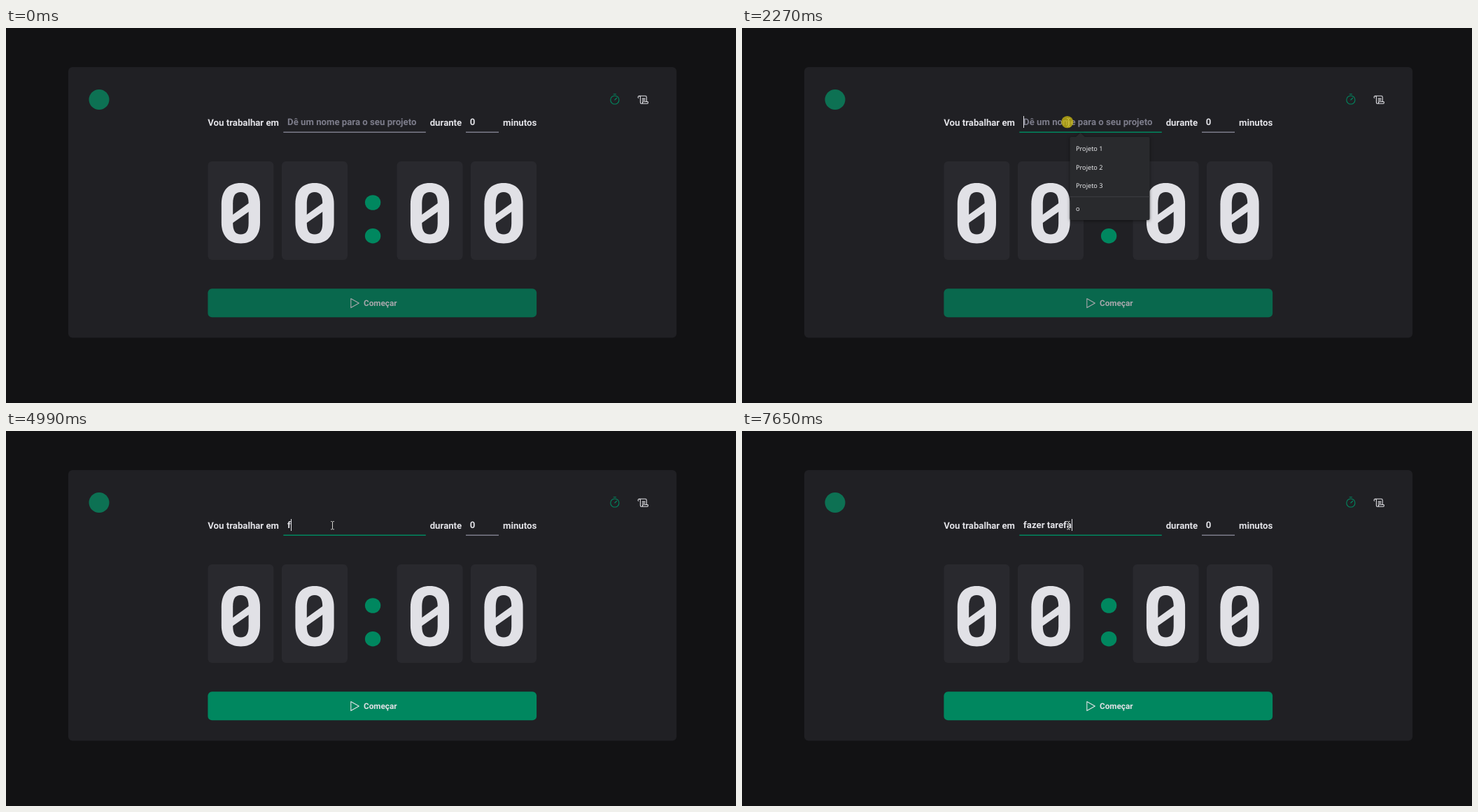
Recreate the animation shown at these times as an HTML page. Size 1043 by 537 pixels, loop 8000 ms.

```html
<!DOCTYPE html>
<html lang="pt-BR">
<head>
<meta charset="utf-8">
<title>Temporizador</title>
<style>
html, body { margin: 0; width: 100%; height: 100%; overflow: hidden; background: #121214; }
svg { display: block; width: 1043px; height: 537px; }
text { font: 700 13.2px Roboto, sans-serif; fill: #e1e1e6; white-space: pre; text-rendering: geometricPrecision; }
#popup text { font: 400 9.2px "Open Sans", sans-serif; fill: #f4f5f7; }
#start text { font-size: 11.75px; }
.icon { fill: none; stroke-width: 16; stroke-linecap: round; stroke-linejoin: round; }
#beam { mix-blend-mode: difference; }
</style>
</head>
<body>
<svg viewBox="0 0 1043 537">
  <defs>
    <g id="zero">
      <path fill="#e1e1e6" fill-rule="evenodd" d="M-27.6-13C-27.6-33-17-43.2 0-43.2S27.6-33 27.6-13V13C27.6 33 17 43.2 0 43.2S-27.6 33-27.6 13ZM-11.2-15V15C-11.2 26-7.5 30.3 0 30.3S11.2 26 11.2 15V-15C11.2-26-7.5-30.3 0-30.3S-11.2-26-11.2-15Z" visibility="hidden"/>
      <path fill="#e1e1e6" d="M-27.6-13C-27.6-33-17-43.2 0-43.2S27.6-33 27.6-13V13C27.6 33 17 43.2 0 43.2S-27.6 33-27.6 13Z"/>
      <path fill="#29292e" d="M-11.2-14C-11.2-25.5-7.5-30.3 0-30.3S11.2-25.5 11.2-14V14C11.2 25.5 7.5 30.3 0 30.3S-11.2 25.5-11.2 14Z"/>
      <path fill="#e1e1e6" d="M-13 3.2 13-15.4V-3.2L-13 15Z"/>
    </g>
  </defs>

  <rect width="1043" height="537" fill="#121214"/>
  <rect x="89" y="56" width="869" height="387.5" rx="5.9" fill="#202024"/>
  <circle cx="133" cy="102.5" r="14.5" fill="#0d7153"/>

  <g class="icon" stroke="#00875f" transform="translate(861 94.2) scale(.0688)">
    <circle cx="128" cy="128" r="88"/>
    <path d="M128 128 168 88M104 8h48"/>
  </g>
  <g class="icon" stroke="#e1e1e6" transform="translate(901.4 94) scale(.0688)">
    <path d="M112 104h56M112 136h56M29 88A24 24 0 1 1 72 72V184a24 24 0 0 0 48 0q0-10-8-16H224q8 6 8 16a24 24 0 0 1-24 24H96M48 48H176a24 24 0 0 1 24 24V168"/>
  </g>

  <text x="288.3" y="139.6">Vou trabalhar em</text>
  <text id="field" x="402.1" y="138.8"></text>
  <text x="605.7" y="139.6">durante</text>
  <text x="662.8" y="138.8">0</text>
  <text x="710" y="139.6">minutos</text>
  <rect id="line" x="396.3" y="148.5" width="203.5" height="1.5"/>
  <rect x="657" y="148.5" width="47" height="1.5" fill="#7c7c8a"/>
  <rect id="caret" y="126" width="1" height="17" fill="#e1e1e6"/>

  <g id="cards"></g>
  <ellipse cx="524.1" cy="250" rx="11.2" ry="10.8" fill="#00875f"/>
  <ellipse cx="524.1" cy="297.7" rx="11.2" ry="10.8" fill="#00875f"/>

  <g id="start">
    <rect x="288.4" y="373.3" width="469.7" height="41" rx="5.9" fill="#00875f"/>
    <path d="M492.8 387.5 504.3 394 492.8 400.6Z" fill="none" stroke="#e1e1e6" stroke-width="1.1" stroke-linejoin="round"/>
    <text x="511" y="398.2">Começar</text>
  </g>

  <g id="popup">
    <path d="M470.5 156H477L483.5 150 490 156H580.5a2 2 0 0 1 2 2V273a2 2 0 0 1-2 2H470.5a2 2 0 0 1-2-2V158a2 2 0 0 1 2-2Z" fill="#292a2d" style="filter:drop-shadow(0 1px 2px rgba(0,0,0,.5))"/>
    <rect x="468.5" y="241.2" width="114" height="1" fill="#3d3e43"/>
    <text x="477" y="176.2">Projeto 1</text>
    <text x="477" y="202.7">Projeto 2</text>
    <text x="477" y="229.2">Projeto 3</text>
    <text x="477" y="262.3">o</text>
  </g>

  <path id="arrow" d="M0 0V12.2L2.8 9.6 4.7 13.8 6.5 13 4.7 8.9H8.6Z" fill="#fff" stroke="#000" stroke-width=".7"/>
  <g id="denied">
    <circle r="4.6" fill="#fff" stroke="#c8141e" stroke-width="1.7"/>
    <path d="M-3.2-3.2 3.2 3.2" stroke="#c8141e" stroke-width="1.7"/>
  </g>
  <path id="beam" d="M-2.4-5.6H-.8L0-5 .8-5.6H2.4M0-5V5M-2.4 5.6H-.8L0 5 .8 5.6H2.4" fill="none" stroke="#fff" stroke-width=".95"/>
  <circle id="click" cx="464.8" cy="134.6" r="8.6" fill="#cdbc12" opacity=".75"/>
</svg>
<script>
const LOOP = 8000, FOCUS = 2270, TYPING = 4990;
const HINT = "Dê um nome para o seu projeto";
const PHRASE = "fazer tarefa";
const keyTimes = [4990, 5070, 5450, 5800, 5930, 6330, 6460, 6730, 6930, 7060, 7520, 7650];
const blinks = [2800, 3330, 3880, 4340, 4920];

// Pointer positions: time, x, y
const pointer = [
  [720, 950, 511], [780, 860, 492], [850, 740, 466], [910, 624, 441],
  [980, 540, 417], [1040, 500, 402], [1110, 488.5, 398.5], [1240, 492, 387],
  [1310, 494, 368], [1380, 489, 318], [1450, 480, 270], [1520, 473.5, 239],
  [1590, 472, 215], [1660, 470, 188], [1730, 468.5, 165], [1800, 467.5, 148],
  [1870, 467, 139], [1940, 466.5, 135.2]
];

const $ = id => document.getElementById(id);
const show = (id, on) => $(id).setAttribute("visibility", on ? "visible" : "hidden");
const passed = (times, t) => times.filter(k => k <= t).length;
const pen = document.createElement("canvas").getContext("2d");
pen.font = "700 13.2px Roboto, sans-serif";

$("cards").innerHTML = [288.4, 394, 558.5, 664].map(x =>
  `<rect x="${x}" y="191" width="94" height="141" rx="5.9" fill="#29292e"/>
   <use href="#zero" x="${x + 47}" y="265.2"/>`).join("");

function shapeAt(x, y) {
  if (y > 373 && y < 414.5 && x < 758) return "denied";
  if ((y > 191 && y < 332) || y < 150) return "beam";
  return "arrow";
}

function drawPointer(t) {
  const step = passed(pointer.map(p => p[0]), t);
  const [, x, y] = pointer[Math.max(0, step - 1)];
  const shape = shapeAt(x, y);
  for (const id of ["arrow", "denied", "beam"]) {
    show(id, step > 0 && id === shape);
    $(id).setAttribute("transform", `translate(${x} ${y})`);
  }
}

function draw(t) {
  const focused = t >= FOCUS, typing = t >= TYPING;
  const typed = PHRASE.slice(0, passed(keyTimes, t));
  $("field").textContent = typed || HINT;
  $("field").style.fill = typing ? "#e1e1e6" : "#7c7c8a";
  $("line").setAttribute("fill", focused ? "#00875f" : "#7c7c8a");
  $("caret").setAttribute("x", Math.round(402 + pen.measureText(typed).width - .2));
  show("caret", typing || (focused && passed(blinks, t) % 2 === 0));
  $("start").setAttribute("opacity", typing ? 1 : .7);
  show("popup", focused && !typing);
  show("click", focused && t < FOCUS + 70);
  drawPointer(t);
}

const began = performance.now();
function tick() {
  draw((performance.now() - began) % LOOP);
  requestAnimationFrame(tick);
}
tick();
</script>
</body>
</html>
```
